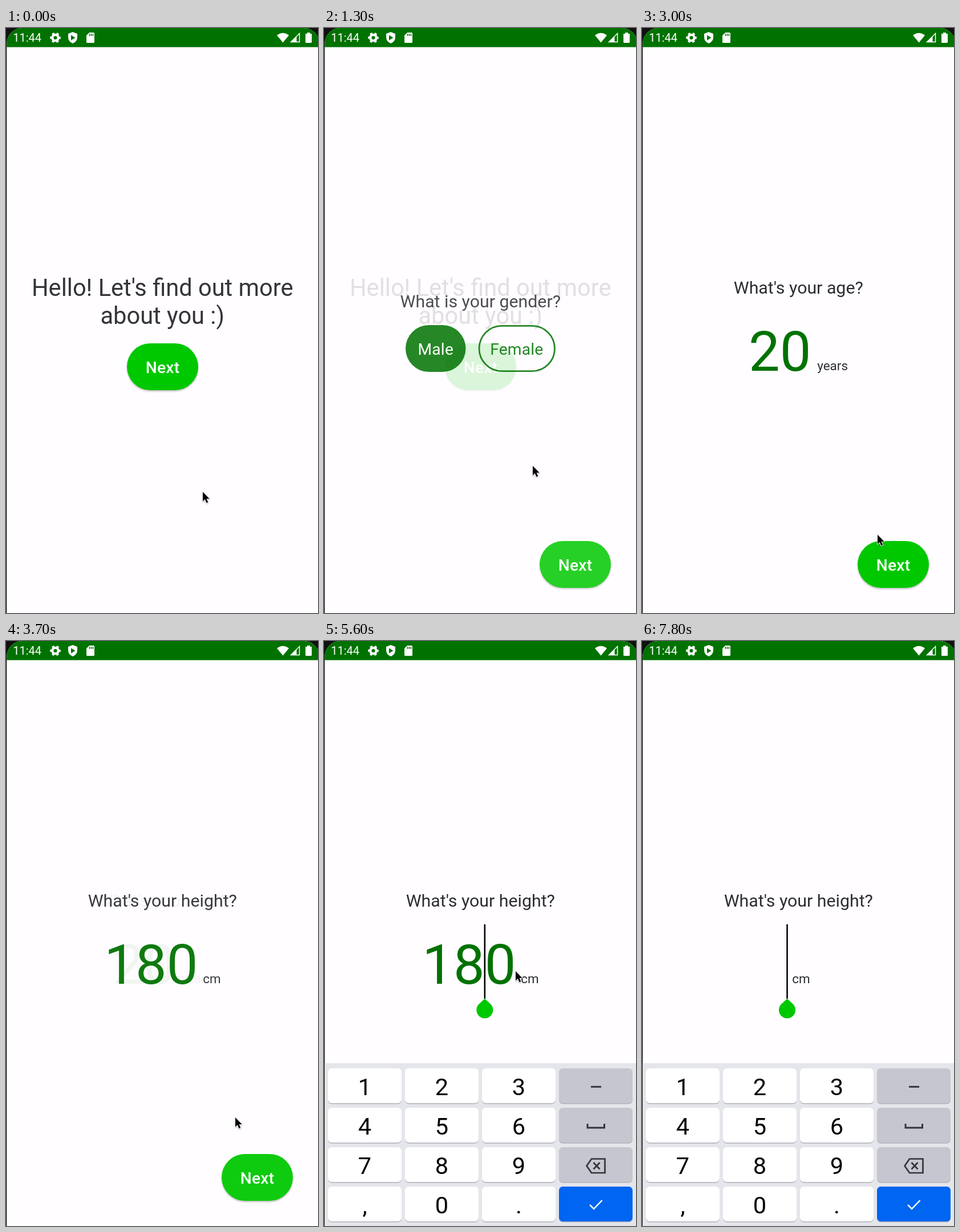
An HTML page for the animation above (8 s loop, 547 px wide and 1024 px high).

```html
<!DOCTYPE html>
<html lang="en">
<head>
<meta charset="utf-8">
<title>Profile questions</title>
<style>
  html, body { margin: 0; height: 100%; overflow: hidden; background: #111; }
  svg { display: block; width: 100vw; height: 100vh; font-family: Roboto, sans-serif; }
  .mid { text-anchor: middle; }
  .ask { font-size: 30.3px; fill: #2d2c31; }
  .big { font-size: 97.3px; fill: #007200; }
  .unit { font-size: 22.4px; fill: #2d2c31; }
  .label { font-size: 28.2px; letter-spacing: .2px; }
  .key { font-size: 41.5px; }
  .next { filter: drop-shadow(0 2px 1.5px rgba(0, 0, 0, .25)); }
  .next.down { filter: drop-shadow(0 4px 5px rgba(0, 0, 0, .32)); }
  .next .glow { fill: #fff; opacity: 0; }
  .next.down .glow { opacity: .08; }
</style>
</head>
<body>
<svg viewBox="0 0 547 1024">
  <clipPath id="display"><rect x="1.3" width="548" height="1100" rx="27"/></clipPath>
  <g clip-path="url(#display)">
    <rect width="547" height="1024" fill="#fffdff"/>

    <g id="hello">
      <g class="mid" font-size="41.6" fill="#353439">
        <text x="274.2" y="469">Hello! Let's find out more</text>
        <text x="274.2" y="518">about you :)</text>
      </g>
    </g>

    <g id="gender">
      <text class="mid ask" x="274.3" y="489">What is your gender?</text>
      <rect x="143" y="520" width="105.5" height="82" rx="41" fill="#007200"/>
      <text class="mid label" x="195.8" y="572" fill="#fff">Male</text>
      <rect x="272" y="521.3" width="132.5" height="79.4" rx="39.7" fill="none" stroke="#007200" stroke-width="2.8"/>
      <text class="mid label" x="337.8" y="572" fill="#007200">Female</text>
    </g>

    <g id="age">
      <text class="mid ask" x="274.3" y="465">What's your age?</text>
      <text class="big" x="187" y="599.5">20</text>
      <text class="unit" x="307.3" y="599">years</text>
    </g>

    <g id="height">
      <text class="mid ask" x="274.3" y="465">What's your height?</text>
      <text class="big" id="digits" y="599.5"></text>
      <text class="unit" id="cm" y="599">cm</text>
      <g id="caret">
        <path id="bar" d="M0 496V626" stroke="#000" stroke-width="2.6"/>
        <path d="M0 626L10.2 635.6A14.5 14.5 0 1 1 -10.2 635.6Z" fill="#00c800"/>
      </g>
    </g>

    <g id="keyboard">
      <rect y="739" width="547" height="285" fill="#e4e6eb"/>
      <g id="keys"></g>
      <g fill="none" stroke="#34353a" stroke-width="3">
        <path d="M468 780.3H486"/>
        <path d="M462 845V852H491.500V845"/>
        <path d="M469 906.500H492.500V931H469L460.500 918.700ZM472.500 913L483.500 924.500M483.500 913L472.500 924.500" stroke-width="2.7"/>
        <path d="M466 987L473 994L487.500 979" stroke="#fff" stroke-width="2.5"/>
      </g>
    </g>

    <rect width="547" height="33.500" fill="#007200"/>
    <g fill="#fff">
      <text x="12.3" y="24" font-size="20">11:44</text>
      <g fill="none" stroke="#fff">
        <circle cx="86.500" cy="17" r="5.2" stroke-width="4.2"/>
        <circle cx="86.500" cy="17" r="8" stroke-width="2.6" stroke-dasharray="4.200 4.178" stroke-dashoffset="2.100"/>
      </g>
      <path d="M117 7L125 10V16Q125 23.500 117 27Q109 23.500 109 16V10Z"/>
      <path d="M114 12.500L121.500 17L114 21.500Z" fill="#007200"/>
      <path d="M146 8H153.500Q155 8 155 9.500V24.500Q155 26 153.500 26H142.500Q141 26 141 24.500V13Z"/>
      <path d="M146.500 10V14M149.500 10V14M152.500 10V14" stroke="#007200" stroke-width="1.500"/>
      <path d="M475 12.800Q485.500 4.500 496 12.800L485.500 25.500Z"/>
      <path d="M499.500 24.500L514.500 9.500V24.500Z" fill="none" stroke="#fff" stroke-width="1.500"/>
      <path d="M499 25L509.500 14.500V25Z"/>
      <path d="M528 8H533V10H536V24.500Q536 26 534.500 26H526.500Q525 26 525 24.500V10H528Z"/>
    </g>
  </g>
  <path id="mouse" d="M0 0V16.500L3.800 13L6.500 19.300L9.300 18.100L6.600 11.900H11.700Z" stroke="#fff" stroke-width="1.800"
    paint-order="stroke" stroke-linejoin="round" style="filter:drop-shadow(0 1px 1px rgba(0,0,0,.3))"/>
</svg>
<script>
const LOOP = 8000, STEP = 100;
const $ = id => document.getElementById(id);
const clamp = v => Math.min(1, Math.max(0, v));

function addNext(screen, x, y) {
  const pill = 'width="125" height="82" rx="41"';
  $(screen).insertAdjacentHTML('beforeend', `<g class="next" transform="translate(${x} ${y})">
    <rect ${pill} fill="#00c800"/><rect class="glow" ${pill}/>
    <text class="mid label" x="62.500" y="52" font-weight="500" fill="#fff">Next</text></g>`);
}
addNext('hello', 212, 552);
for (const screen of ['gender', 'age', 'height']) addNext(screen, 378, 898);

$('keys').innerHTML = [...'123 456 789 ,0. '].map((char, i) => {
  const x = 7 + i % 4 * 135, y = 748 + (i >> 2) * 69;
  const fill = i === 15 ? '#0065f0' : i % 4 === 3 ? '#c5c6cf' : '#fff';
  return `<rect x="${x}" y="${y + 1.500}" width="129" height="61" rx="6.500" fill="#b0b2b8"/>
    <rect x="${x}" y="${y}" width="129" height="61" rx="6.500" fill="${fill}"/>
    <text class="mid key" x="${x + 64.500}" y="${y + 47}">${char}</text>`;
}).join('');

// cubic-bezier(.4, 0, .2, 1)
function ease(x) {
  let low = 0, high = 1, s;
  for (let i = 0; i < 20; i++) {
    s = (low + high) / 2;
    if (1.2 * s * (1 - s) ** 2 + .6 * s * s * (1 - s) + s ** 3 < x) low = s; else high = s;
  }
  return s * s * (3 - 2 * s);
}
const progress = (t, start, length) => ease(clamp((t - start) / length));

// Each screen: when it is entered and when its button is pressed
const screens = [
  { id: 'hello', enter: -1000, press: 700 },
  { id: 'gender', enter: 900, press: 2200 },
  { id: 'age', enter: 2300, press: 3100 },
  { id: 'height', enter: 3200, press: Infinity }
];

// Pointer stops: time, x, y
const stops = [
  [100, 345, 812], [500, 308, 603], [1000, 308, 603], [1600, 424, 930], [2100, 419, 925],
  [2400, 418, 922], [3000, 413, 887], [3150, 412, 905], [3300, 411, 900], [3700, 402, 834],
  [4400, 280, 588], [4800, 280, 588], [5600, 336, 578], [LOOP, 336, 578]
];

function pointer(t) {
  const i = Math.max(1, stops.findIndex(stop => stop[0] >= t));
  const [t0, x0, y0] = stops[i - 1], [t1, x1, y1] = stops[i];
  const k = clamp((t - t0) / (t1 - t0)), p = k * k * (3 - 2 * k);
  return [x0 + (x1 - x0) * p, y0 + (y1 - y0) * p];
}

const TAP = 4600, TAP_END = 6100, DIGIT = 54.65;
const deletions = [6500, 6700, 6800];

function drawField(t) {
  const deleted = deletions.filter(time => t >= time);
  const count = 3 - deleted.length;
  const start = 254.3 - count * DIGIT / 2;
  const place = t < TAP_END ? 2 : count;
  const active = deleted.pop() || (t < TAP_END ? TAP : TAP_END);
  $('digits').textContent = '180'.slice(0, count);
  $('digits').setAttribute('x', start);
  $('cm').setAttribute('x', start + count * DIGIT + 9);
  $('caret').setAttribute('transform', `translate(${start + place * DIGIT + .2})`);
  $('caret').style.display = t < TAP ? 'none' : '';
  $('bar').style.display = Math.floor((t - active) / 500) % 2 ? 'none' : '';
}

function draw(t) {
  screens.forEach(({ id, enter, press }, i) => {
    const next = screens[i + 1];
    const alpha = progress(t, enter, 700) * (1 - (next ? progress(t, next.enter, 700) : 0));
    const group = $(id);
    group.style.display = alpha > 0.001 ? '' : 'none';
    group.style.opacity = alpha;
    group.querySelector('.next').classList.toggle('down', t >= press && t < press + 400);
  });
  drawField(t);
  $('keyboard').setAttribute('transform', `translate(0 ${285 * (1 - progress(t, 4700, 400))})`);
  $('mouse').setAttribute('transform', `translate(${pointer(t)})`);
  $('mouse').style.display = t < deletions[0] ? '' : 'none';
}

const begin = performance.now();
function tick() {
  const t = (performance.now() - begin) % LOOP;
  draw(Math.floor(t / STEP) * STEP);
  requestAnimationFrame(tick);
}
tick();
</script>
</body>
</html>
```
